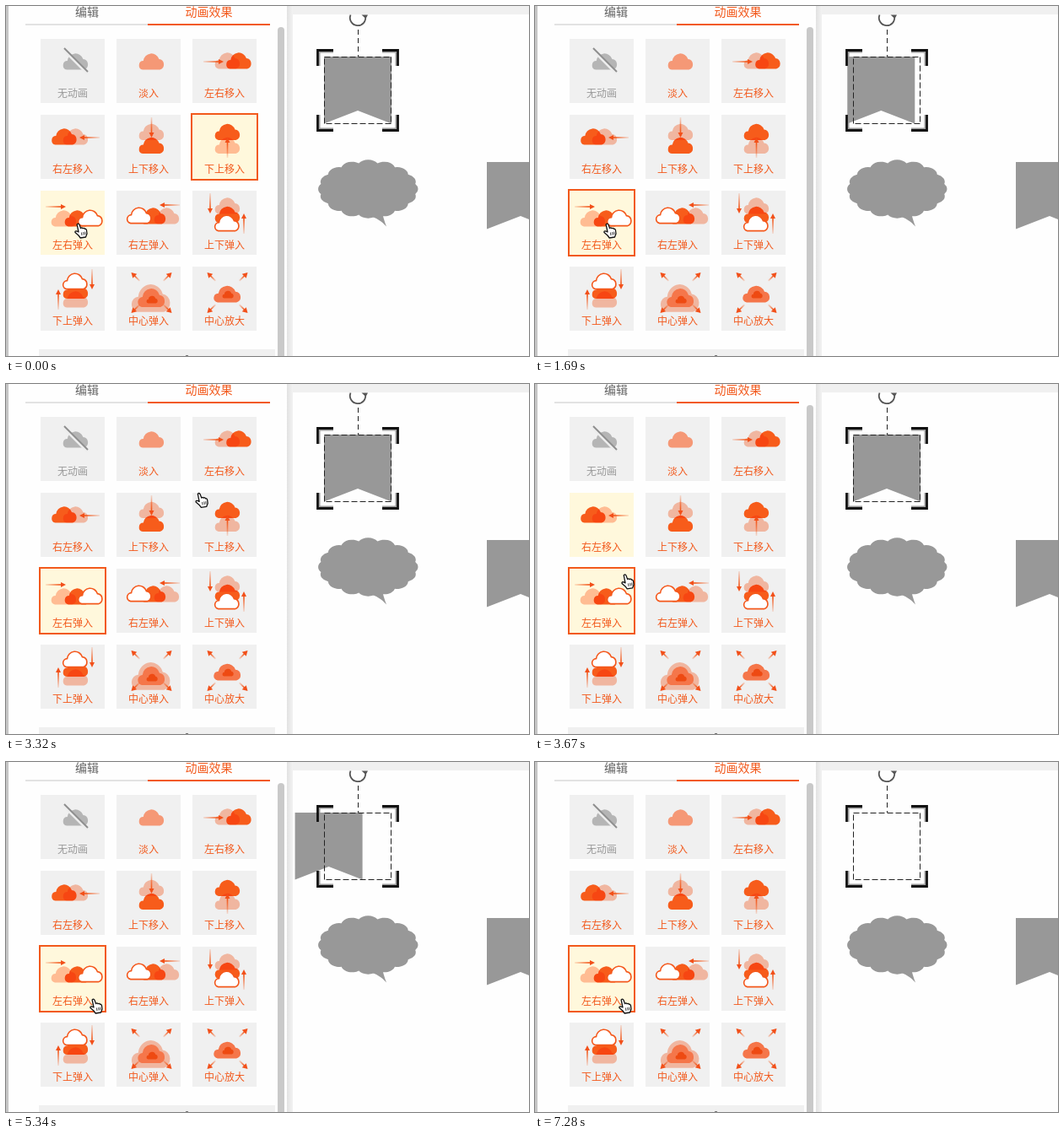
Animation of 620x415 px, one loop 8 s. Source, as an HTML page:

```html
<!DOCTYPE html>
<html lang="zh">
<head>
<meta charset="utf-8">
<style>
html, body { margin: 0; width: 100%; height: 100%; overflow: hidden; background: #fefefe; }
svg { display: block; width: 620px; height: 415px; }
text { font-family: "Noto Sans CJK SC", "Noto Sans CJK", sans-serif; font-size: 12px; text-anchor: middle; fill: #f2591c; }
.tab { font-size: 14px; }
.light { fill: #ffc2aa; mix-blend-mode: multiply; }
.solid { fill: #f75c1b; }
.hollow { fill: #fff; stroke: #f4581c; stroke-width: 1.7; }
.mid { fill: #f5764a; }
.deep { fill: #ee4a12; }
.pale { fill: #f59876; }
.off { fill: #b5b5b5; }
</style>
</head>
<body>
<svg viewBox="0 0 620 415" xmlns="http://www.w3.org/2000/svg">
  <defs>
    <linearGradient id="tail"><stop offset="0" stop-color="#f2591c" stop-opacity=".15"/><stop offset=".8" stop-color="#f2591c"/></linearGradient>
    <linearGradient id="shade"><stop offset="0" stop-color="#e2e2e2"/><stop offset="1" stop-color="#f2f2f2"/></linearGradient>
    <path id="cloud" d="M5.5 21A5.3 5.3 0 0 1 6.3 10.5A9.6 9.6 0 0 1 25 8.5A6.4 6.4 0 0 1 26 21Z"/>
    <path id="banner" d="M0 0H80V79.5L40 64L0 79.5Z" fill="#989898"/>
    <g id="arrow"><rect x="-24" y="-.8" width="21" height="1.6" fill="url(#tail)"/><path d="M0 0L-6 -3V3Z" fill="#f2501a"/></g>
    <g id="spike"><rect x="-14" y="-.9" width="11" height="1.8" fill="url(#tail)"/><path d="M0 0L-6 -3.5V3.5Z" fill="#f2501a"/></g>
    <g id="corner" fill="none"><path d="M3.8 20V3.8H20" stroke="#999" stroke-width="1.4"/><path d="M1.5 20V1.5H20" stroke="#111" stroke-width="2.8"/></g>
  </defs>

  <!-- page -->
  <rect x="333" width="287" height="10" fill="#f0f0f0"/>
  <rect x="333" width="7" height="415" fill="url(#shade)"/>
  <g id="bubble" fill="#989898"><path d="M432 249Q444 253 451 261.5Q448 254 446 245Z"/></g>
  <use href="#banner" x="570" y="185"/>
  <g id="flag"><use href="#banner" x="377" y="60"/></g>
  <g fill="none" stroke="#222">
    <path d="M377.5 60.5H457M456.5 60.5V140M456.5 139.5H377M377.5 139.5V60" stroke-dasharray="7 3"/>
    <path d="M417.5 28V60" stroke-dasharray="6 4"/>
    <path d="M408.5 10.5A9.2 9.2 0 1 0 426 12" stroke="#555" stroke-width="1.8"/>
  </g>
  <path d="M421.5 10.5H429L426.5 15Z" fill="#555"/>
  <g id="frame"></g>
  <rect x="400" y="4" width="34" height="6" fill="#f0f0f0"/>

  <!-- panel -->
  <rect width="333" height="415" fill="#fefefe"/>
  <rect width="3" height="415" fill="#c6c6c6"/>
  <rect x="23" y="21" width="145" height="2" fill="#e2e2e2"/>
  <rect x="168" y="21" width="145" height="2" fill="#f2591c"/>
  <text class="tab" x="96" y="12" style="fill:#666">编辑</text>
  <text class="tab" x="240.5" y="12">动画效果</text>
  <rect x="39" y="407" width="280" height="8" fill="#f0f0f0"/>
  <rect x="213" y="414" width="3" height="1" fill="#777"/>
  <path id="bar" d="M322 415V29A4 4 0 0 1 330 29V415Z" fill="#c9c9c9"/>
  <g id="tiles"></g>
  <rect id="pick" width="78" height="78" fill="#fff8dc" stroke="#f2591c" stroke-width="2"/>
  <g id="icons"></g>

  <g id="hand"><path d="M3.2 1Q4.8 -1 6 1.2L7.6 5.6Q9 4.3 10 5.7Q11.6 4.6 12.5 6.4Q14 5.8 14.5 8L15 12L13.5 16L7.2 17L5 14L1 10.6Q.6 8.4 3 9L5 10Z" fill="#fff" stroke="#111" stroke-width="1.3" stroke-linejoin="round"/><path d="M8.4 10.5L9 14M10.6 10L11.2 13.5M12.6 9.7L13 13" stroke="#111" stroke-width=".8"/></g>
</svg>
<script>
const LOOP = 8000;
const TILE = 76, STEP = 90, LEFT = 41, TOP = 39;
const $ = id => document.getElementById(id);
const add = (id, markup) => $(id).insertAdjacentHTML('beforeend', markup);
const clamp = v => Math.min(1, Math.max(0, v));

// Icons: u, v give the direction of movement
const cloud = (kind, x, y, sx = 1, sy = sx) =>
  `<use href="#cloud" class="${kind}" transform="translate(${x} ${y}) scale(${sx} ${sy})"/>`;
const arrow = (x, y, u, v, id = 'arrow') =>
  `<use href="#${id}" transform="translate(${x} ${y}) rotate(${Math.atan2(v, u) * 180 / Math.PI})"/>`;

function slide(u, v) {
  const y = v ? 17 : 14.5;
  return cloud('solid', 25.5 + 13.5 * u, y + 8 * v) + cloud('light', 25.5, y - 8 * v)
    + arrow(41.5 - 4.5 * u, 27, u, v);
}
function bounce(u, v) {
  const x = u ? 27.5 : 25.5, y = u ? 20 + 1.5 * u : 17;
  const layers = ['solid', 'light', 'hollow'].map((kind, i) => {
    const k = [0, -1, 1][i];
    return cloud(kind, x + 16 * k * u, y + 10.5 * k * v, kind === 'hollow' ? .96 : 1);
  });
  const arrows = u ? arrow(40.5 - 10.5 * u, 18 + u, u, 0) : arrow(21, 27, 0, v) + arrow(61, 27, 0, -v);
  return layers.join('') + arrows;
}
function grow(glow) {
  const spikes = [-1, 1].flatMap(u => [-1, 1].map(v => arrow(41.5 + 24 * u, 31 + 24 * v, u, v, 'spike')));
  return (glow ? cloud('light', 16, 18, 1.55, 1.7) : '')
    + cloud('mid', 24, 21 + 3 * glow, 1.08, 1.02 + .12 * glow)
    + cloud('deep', 35, 28 + 6 * glow, .45) + spikes.join('');
}
const slash = '<path d="M27 12L56 41" stroke="#eee" stroke-width="4"/><path d="M28 11L56 39" stroke="#8e8e8e" stroke-width="2"/>';

const tiles = [
  ['无动画', cloud('off', 25.5, 15.5) + slash],
  ['淡入', cloud('pale', 25.5, 15.5)],
  ['左右移入', slide(1, 0)],
  ['右左移入', slide(-1, 0)],
  ['上下移入', slide(0, 1)],
  ['下上移入', slide(0, -1)],
  ['左右弹入', bounce(1, 0)],
  ['右左弹入', bounce(-1, 0)],
  ['上下弹入', bounce(0, 1)],
  ['下上弹入', bounce(0, -1)],
  ['中心弹入', grow(1)],
  ['中心放大', grow(0)]
];
const corner = i => [LEFT + i % 3 * STEP, TOP + Math.floor(i / 3) * STEP];
tiles.forEach(([name, icon], i) => {
  const [x, y] = corner(i);
  add('tiles', `<rect id="tile${i}" x="${x}" y="${y}" width="${TILE}" height="${TILE}"/>`);
  add('icons', `<g transform="translate(${x} ${y})">${icon}<text x="38" y="69"${i ? '' : ' style="fill:#999"'}>${name}</text></g>`);
});

for (const sx of [-1, 1])
  for (const sy of [-1, 1])
    add('frame', `<use href="#corner" transform="translate(${417 - 49 * sx} ${100 - 49 * sy}) scale(${sx} ${sy})"/>`);

// Scalloped outline: arcs between points on an ellipse
let outline = '';
const bumps = 16;
for (let i = 0; i <= bumps; i++) {
  const a = (i + .5) / bumps * 2 * Math.PI;
  const p = `${(429.3 + 57 * Math.cos(a)).toFixed(1)} ${(217 + 31 * Math.sin(a)).toFixed(1)}`;
  outline += i ? `A13 9 0 0 1 ${p}` : `M${p}`;
}
add('bubble', `<path d="${outline}Z"/>`);

// Flag: hidden on each click, then bounces in from the left
const CLICKS = [320, 4360, 7280];
const DELAY = 280, SPAN = 1600;
const BOUNCE = [[0, -3000], [.6, 25], [.75, -10], [.9, 5], [1, 0]];
function flagX(t) {
  const click = CLICKS.filter(c => c <= t).pop();
  if (click === undefined) return 0;
  const p = clamp((t - click - DELAY) / SPAN);
  const i = Math.max(1, BOUNCE.findIndex(([k]) => p <= k));
  const [[k0, x0], [k1, x1]] = [BOUNCE[i - 1], BOUNCE[i]];
  return x1 + (x0 - x1) * (1 - (p - k0) / (k1 - k0)) ** 3;
}

// Pointer moves: start, end, x, y
const MOVES = [
  [2190, 2450, 117, 166],
  [2720, 2850, 336, 90],
  [3190, 3320, 225, 129],
  [3320, 3600, 106, 190],
  [3600, 3920, 96, 281],
  [4990, 5050, 99, 281]
];
function pointer(t) {
  let x = 81, y = 258;
  for (const [from, to, nx, ny] of MOVES) {
    const p = clamp((t - from) / (to - from)), q = p * (2 - p);
    x += (nx - x) * q;
    y += (ny - y) * q;
  }
  return [x, y];
}

const LAG = 60;
function hovered(t) {
  const [x, y] = pointer(t - LAG);
  return tiles.findIndex((_, i) => {
    const [l, top] = corner(i);
    const dx = x + 4 - l, dy = y + 1 - top;
    return dx >= 0 && dx < TILE && dy >= 0 && dy < TILE;
  });
}

const place = (id, x, y = 0) => $(id).setAttribute('transform', `translate(${x} ${y})`);
function draw() {
  const t = performance.now() % LOOP;
  const over = hovered(t);
  const [px, py] = corner(t < 210 ? 5 : 6);
  place('flag', flagX(t));
  place('hand', ...pointer(t));
  place('pick', px - 1, py - 1);
  tiles.forEach((_, i) => $('tile' + i).setAttribute('fill', i === over ? '#fff8dc' : '#f0f0f0'));
  $('bar').setAttribute('opacity', t < 3400 ? 1 - clamp((t - 2980) / 60) : 1);
  requestAnimationFrame(draw);
}
draw();
</script>
</body>
</html>
```
